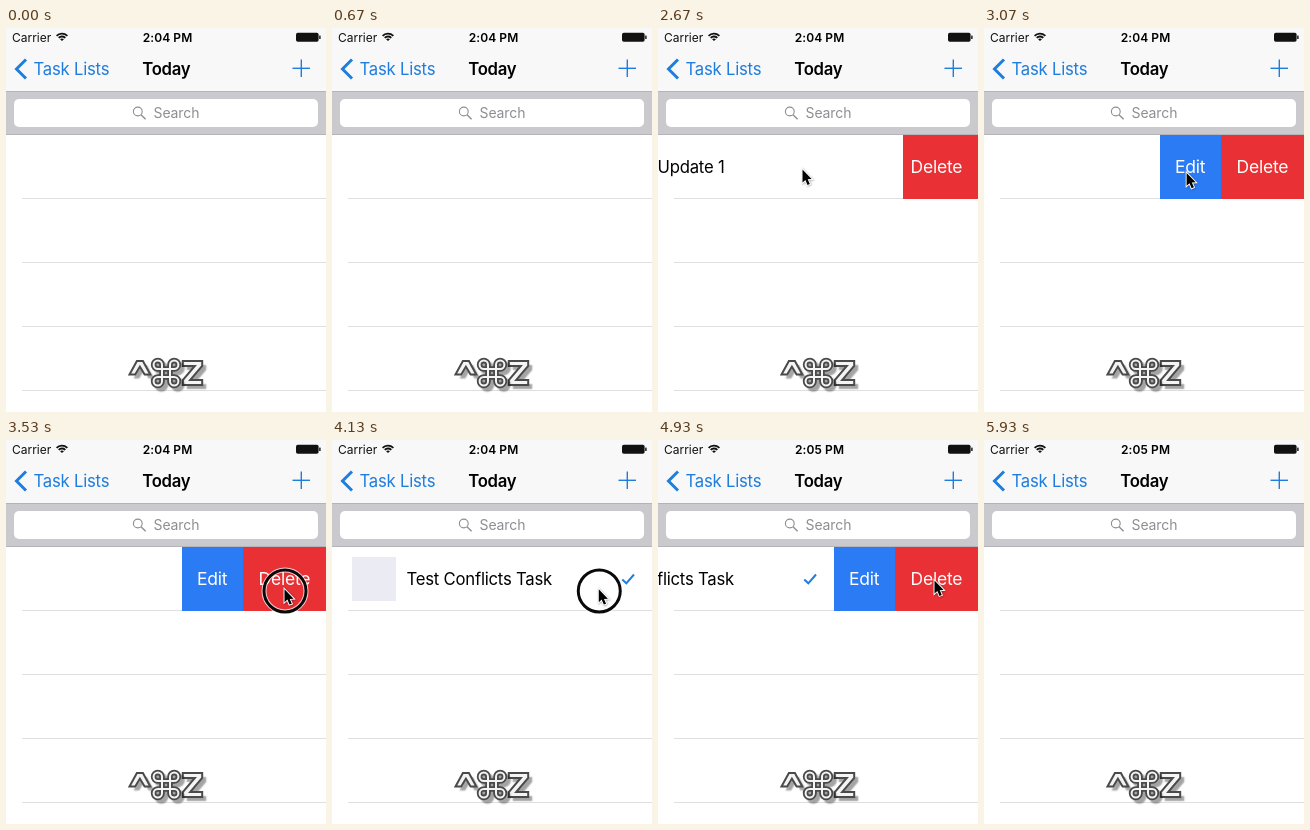
Write an HTML page with a canvas that moves like this. It is 320 px wide and 384 px high and loops after 6.39 s.

```html
<!DOCTYPE html>
<html lang="en">
<head>
<meta charset="utf-8">
<title>Task list</title>
<style>
  html, body { margin: 0; width: 320px; height: 384px; overflow: hidden; background: #fff; }
  canvas { display: block; width: 320px; height: 384px; }
</style>
</head>
<body>
<canvas id="stage"></canvas>
<script>
const W = 320, H = 384, LOOP = 6390, STEP = 1000 / 15;
const ROW_TOP = 107, ROW_H = 64, EDIT_W = 61, DELETE_W = 83, DRAG = 75;
const TINT = '#1f7ddd', EDIT = '#2a7bf4', RED = '#e93034', GREY = '#8e8e93';
const FONT = 'Inter, "Liberation Sans", sans-serif';

const stage = document.getElementById('stage');
const ratio = window.devicePixelRatio || 1;
stage.width = W * ratio;
stage.height = H * ratio;
const ctx = stage.getContext('2d');
ctx.scale(ratio, ratio);

// Each row is grabbed, dragged left, let go, then deleted with a tap.
const rest = { x: 144, y: 141 };
const tasks = [
  { name: 'Update 1', done: false, shown: 1800, reach: 2130, grab: 2190, letGo: 2666,
    back: 3390, tap: 3390, lift: 3595, gone: 3860,
    start: { x: 222, y: 149 }, hit: { x: 278, y: 148.7 } },
  { name: 'Test Conflicts Task', done: true, shown: 3925, reach: 3930, grab: 4130, letGo: 4560,
    back: 4900, tap: 4990, lift: 5060, gone: 5260,
    start: { x: 266.3, y: 148.7 }, hit: { x: 276, y: 140 } }
];

const within = (t, from, to) => t >= from && t < to;
const mix = (a, b, k) => a + (b - a) * k;

function ease(t, from, to) {
  const k = Math.min(1, Math.max(0, (t - from) / (to - from)));
  return k * k * (3 - 2 * k);
}

function slideOf(task, t) {
  const snap = EDIT_W + DELETE_W - DRAG;
  return DRAG * ease(t, task.grab, task.letGo) + snap * ease(t, task.letGo, task.letGo + 270);
}

function pointerAt(t) {
  let { x, y } = tasks[0].start;
  const go = (to, from, until) => {
    const k = ease(t, from, until);
    x = mix(x, to.x, k);
    y = mix(y, to.y, k);
  };
  for (const task of tasks) {
    go(task.start, task.reach - 330, task.reach);
    go(rest, task.grab, task.letGo - 20);
    go(task.hit, task.letGo + 130, task.back);
  }
  return { x, y };
}

function rect(x, y, w, h, color) {
  ctx.fillStyle = color;
  ctx.fillRect(x, y, w, h);
}

function pill(x, y, w, h, r, color) {
  ctx.fillStyle = color;
  ctx.beginPath();
  ctx.roundRect(x, y, w, h, r);
  ctx.fill();
}

function text(str, x, y, color, { size = 16.7, weight = 400, spacing = -0.22, align = 'left' } = {}) {
  ctx.font = `${weight} ${size}px ${FONT}`;
  ctx.letterSpacing = spacing + 'px';
  ctx.textAlign = align;
  ctx.fillStyle = color;
  ctx.fillText(str, x, y);
}

function trace(points, closed) {
  ctx.beginPath();
  points.forEach(([x, y]) => ctx.lineTo(x, y));
  if (closed) ctx.closePath();
}

function stroke(width, color) {
  ctx.lineWidth = width;
  ctx.strokeStyle = color;
  ctx.stroke();
}

function line(points, width, color) {
  trace(points);
  stroke(width, color);
}

function ring(x, y, r, width, color, from = 0, to = Math.PI * 2) {
  ctx.beginPath();
  ctx.arc(x, y, r, from, to);
  stroke(width, color);
}

function statusBar(t) {
  text('Carrier', 6, 14, '#111', { size: 12, spacing: 0 });
  text(t < 4400 ? '2:04 PM' : '2:05 PM', 161.5, 14, '#000',
    { size: 12, weight: 600, spacing: 0.1, align: 'center' });
  for (const r of [1.3, 4.5, 7.4]) {
    ring(56, 13, r, r < 2 ? 2.6 : 1.8, '#111', -Math.PI * 0.76, -Math.PI * 0.24);
  }
  pill(290, 4.8, 22.6, 9, 1.8, '#111');
  rect(313.2, 7.6, 1.4, 3.4, '#111');
}

function header(t) {
  rect(0, 0, W, 63, '#f8f8f8');
  rect(0, 63, W, 1, '#b4b4b6');
  statusBar(t);
  line([[20, 31.5], [10.5, 41], [20, 50.5]], 3, TINT);
  text('Task Lists', 27.5, 47, TINT);
  text('Today', 160.3, 47, '#000', { weight: 600, align: 'center' });
  line([[286.5, 40.3], [304, 40.3]], 1.4, TINT);
  line([[295.3, 31.4], [295.3, 49]], 1.4, TINT);

  rect(0, 64, W, 43, '#c9c9ce');
  rect(0, 106, W, 1, '#b5b5b9');
  pill(8, 71, 304, 28, 5, '#fff');
  ring(131.8, 83.5, 4.4, 1.1, GREY);
  line([[135, 86.7], [139.6, 91.2]], 1.4, GREY);
  text('Search', 147.5, 90, GREY, { size: 14, spacing: -0.1 });
}

function taskRow(task, t) {
  if (!within(t, task.shown, task.gone)) return;
  const shift = slideOf(task, t), edge = W - shift;
  ctx.save();
  ctx.beginPath();
  ctx.rect(0, ROW_TOP, W, ROW_H);
  ctx.clip();
  ctx.translate(0, -ROW_H * ease(t, task.lift, task.gone));

  // The buttons stay put and are uncovered by the sliding cell.
  ctx.save();
  ctx.beginPath();
  ctx.rect(edge, ROW_TOP, shift, ROW_H);
  ctx.clip();
  rect(W - DELETE_W - EDIT_W, ROW_TOP, EDIT_W, ROW_H, EDIT);
  rect(W - DELETE_W, ROW_TOP, DELETE_W, ROW_H, RED);
  text('Edit', 191, 145, '#fff', { size: 17.5 });
  text('Delete', 252.5, 145, '#fff', { size: 17.5 });
  ctx.restore();

  ctx.beginPath();
  ctx.rect(0, ROW_TOP, edge, ROW_H);
  ctx.clip();
  ctx.translate(-shift, 0);
  rect(20, 117, 44, 44, '#ebecf3');
  text(task.name, 74.5, 145, '#000');
  if (task.done) line([[290.3, 139.5], [294.3, 143.3], [302, 134.5]], 2, TINT);
  ctx.restore();
}

function loopedSquare(s, r) {
  ctx.beginPath();
  for (let i = 0; i < 4; i++) {
    ctx.lineTo(s, 0);
    ctx.arc(s + r, -s - r, r, Math.PI, Math.PI * 2.5);
    ctx.lineTo(0, -s);
    ctx.rotate(-Math.PI / 2);
  }
  ctx.closePath();
}

function shadow(alpha, offset, blur) {
  ctx.shadowColor = `rgba(0,0,0,${alpha})`;
  ctx.shadowBlur = blur * ratio;
  ctx.shadowOffsetX = ctx.shadowOffsetY = offset * ratio;
}

function shortcut() {
  const dark = '#4a4a4a', light = '#f4f4f4';
  const caretHalf = [[-3, -6.7], [-10.4, 6.8], [-4.7, 6.8]];
  const zedHalf = [[-9.7, -12], [9.7, -12], [9.7, -7], [-2.3, 7], [9.7, 7]];
  const caret = [...caretHalf, [0, -1.2], ...caretHalf.map(([x, y]) => [-x, y]).reverse()];
  const zed = [...zedHalf, ...zedHalf.map(([x, y]) => [-x, -y])];

  const glyph = (x, y, paint) => {
    ctx.save();
    ctx.translate(x, y);
    paint();
    ctx.restore();
  };
  const outlined = points => () => {
    trace(points, true);
    ctx.fillStyle = light;
    shadow(0.36, 4, 1.5);
    ctx.fill();
    shadow(0, 0, 0);
    stroke(2, dark);
  };
  glyph(133.9, 339.8, outlined(caret));
  glyph(186.5, 345, outlined(zed));
  glyph(160, 345, () => {
    loopedSquare(4, 4.2);
    shadow(0.36, 3.6, 1.5);
    stroke(5.6, dark);
    shadow(0, 0, 0);
    stroke(2, light);
  });
}

function pointer(t) {
  if (!within(t, tasks[0].reach, tasks[1].gone)) return;
  const { x, y } = pointerAt(t);
  ctx.save();
  ctx.translate(x, y);
  if (tasks.some(a => within(t, a.grab - 65, a.letGo - 60) || within(t, a.tap, a.lift))) {
    ring(1, 2.3, 21, 5, 'rgba(255,255,255,.75)');
    ring(1, 2.3, 21, 3, '#0a0a0a');
  }
  trace([[0.5, 0.6], [0.5, 13.5], [3.4, 10.9], [5.5, 15.9], [7.8, 15], [5.7, 10.2], [9.6, 10]], true);
  shadow(0.35, 0.6, 2);
  stroke(1.9, '#fff');
  shadow(0, 0, 0);
  ctx.fillStyle = '#000';
  ctx.fill();
  ctx.restore();
}

function draw(t) {
  rect(0, 0, W, H, '#fff');
  for (let y = 170; y < H; y += ROW_H) rect(16, y, W - 16, 1, '#dfdfe1');
  tasks.forEach(task => taskRow(task, t));
  header(t);
  shortcut();
  pointer(t);
}

const start = performance.now();
function tick() {
  const t = (performance.now() - start) % LOOP;
  draw(Math.floor((t + 5) / STEP) * STEP);
  requestAnimationFrame(tick);
}
tick();
</script>
</body>
</html>
```
